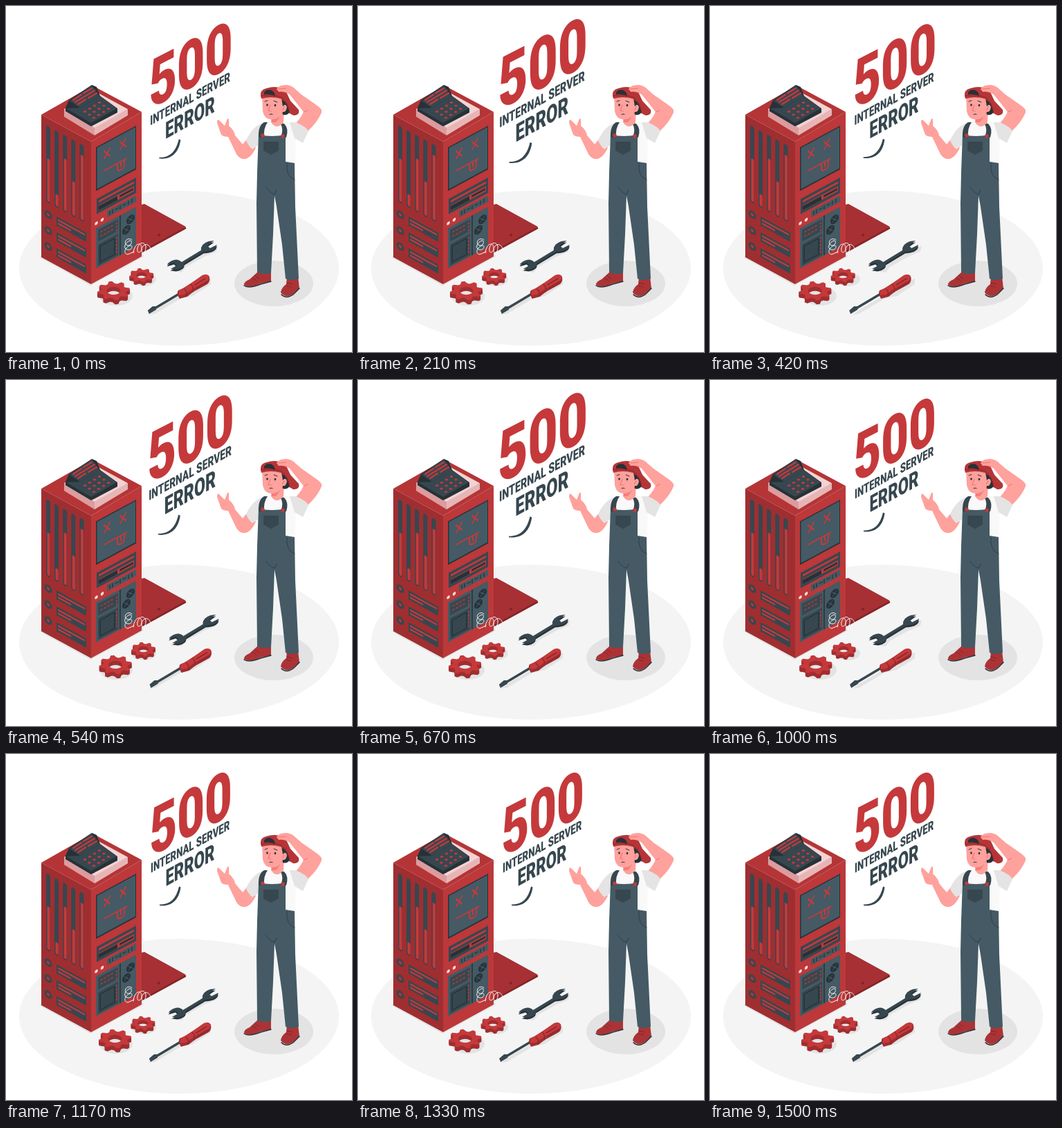
An HTML page that plays this animation: 500x500 px, repeating every 1540 ms.

```html
<!DOCTYPE html>
<html lang="en">
<head>
<meta charset="utf-8">
<title>500 Internal Server Error</title>
<style>
html, body { margin: 0; width: 100%; height: 100%; overflow: hidden; background: #fff; }
svg { display: block; width: 100vw; height: 100vh; }
text { font-family: Roboto, "Liberation Sans", sans-serif; font-weight: 900; }
.red { fill: #c5393b; } .mid { fill: #b53537; } .deep { fill: #9f2e31; } .dark { fill: #842427; }
.slate { fill: #455a64; } .navy { fill: #37474f; } .ink { fill: #263238; }
.skin { fill: #ffa19c; } .shade { fill: #e3e3e3; } .shirt { fill: #f9f9f9; } .sleeve { fill: #e4e4e4; }
.line { fill: none; stroke-linecap: round; stroke-linejoin: round; }
</style>
</head>
<body>
<svg viewBox="0 0 500 500">
  <ellipse cx="250" cy="379" rx="231" ry="112" fill="#f4f4f4"/>
  <ellipse class="shade" cx="387" cy="401" rx="57" ry="33"/>

  <!-- loose side panel -->
  <path class="shade" d="M196 290L262 321L196 358Z"/>
  <path class="dark" d="M196 288L260 320V322L196 357Z"/>
  <path fill="#a63033" d="M196 287L200 286L260 319L196 354Z"/>
  <circle class="dark" cx="221" cy="331" r="2"/>

  <!-- tower -->
  <path class="shade" d="M48 363L122 404L199 362L196 355L60 355Z"/>
  <path class="mid" d="M51 157L125 115L196 153L123 196Z"/>
  <path class="deep" d="M51 157L123 196V402L51 363Z"/>
  <path fill="#bc383a" d="M123 196L196 153V362L123 402Z"/>
  <g id="leftFace" transform="matrix(1 .55 0 1 51 157)"></g>
  <g transform="matrix(1 -.54 0 1 123 196)">
    <path class="ink" d="M7 12H65V75H7Z"/>
    <path class="slate" d="M8.500 13.500H64V73H8.500Z"/>
    <g class="line" stroke="#c5393b" stroke-width="2">
      <path d="M19 24L27 35M27 24L19 35M42 23L50 34M50 23L42 34M19 52H51M38 52V59Q38 64 43 64Q48 64 48 59V52M43 52V59"/>
    </g>
    <path class="navy" d="M8 87H65V109H8Z"/>
    <path class="red" d="M11 91H62V94H11ZM11 98H62V105H11Z"/>
    <path class="ink" d="M11 99H38V105H11ZM41 100H61V103H41Z"/>
    <g fill="#f4dcdc"><circle cx="7.5" cy="122" r="2.3"/><circle cx="16" cy="121.500" r="2.3"/></g>
    <path class="slate" d="M23 113H65V122H23Z"/>
    <path class="line" stroke="#263238" stroke-width="1.300" d="M27 115V120M31 115V120M35 117H39M42 115V120M46 117H50M54 115V120M59 115V120"/>
    <path class="slate" d="M7 129H65V187H7Z"/>
    <path class="navy" d="M10 133H39V150H10ZM10 154H39V185H10Z"/>
    <path class="line" stroke="#263238" stroke-width="1.500" d="M13 158H34V181H13ZM42 130V186"/>
    <path class="line" stroke="#c5393b" stroke-width="1.500" stroke-dasharray="2 3" d="M14 138H31M14 144H31M37 137V150M37 158V182"/>
    <g class="ink"><circle cx="57" cy="143" r="6"/><circle cx="51" cy="155" r="6"/></g>
    <path class="line" stroke="#455a64" d="M54 146L60 140M48 158L54 152M54 140L60 146M48 152L54 158"/>
  </g>
  <g class="line" stroke="#f5f5f5">
    <path d="M182 338C176 333 169 341 174 345S184 341 180 339C173 340 168 350 175 352S184 346 180 346C173 347 168 358 176 359L185 355"/>
    <path d="M184 357C185 344 194 340 196 348S188 360 190 350C192 341 201 340 202 348S195 360 196 351C199 342 207 343 209 351"/>
  </g>

  <!-- console on the roof -->
  <path fill="#dc9c9d" d="M84 149L128 174V187L84 160Z"/>
  <path fill="#e7b5b5" d="M128 174L176 149V158L128 187Z"/>
  <path fill="#f3d3d3" d="M84 149L130 124L176 149L128 176Z"/>
  <path class="ink" d="M86 147L91 136L124 114L131 117L136 130L161 148V154L123 174L86 152Z"/>
  <path class="navy" d="M92 137L124 115L135 130L107 147Z"/>
  <path class="navy" d="M87 148L107 147L135 130L160 148L123 169Z"/>
  <path class="line" stroke="#c5393b" stroke-width="2.200" d="M97 136L109 128M112 126L124 119M100 139L128 122M104 142L115 135M119 133L131 126"/>
  <g id="keys" class="red"></g>

  <!-- static shadows of the tools -->
  <g class="shade">
    <ellipse cx="159" cy="419" rx="24" ry="14"/><ellipse cx="199" cy="395" rx="18" ry="10"/>
    <path d="M237 383L247 374L286 352L306 347L304 355L287 362L260 377L254 385Z"/>
    <path d="M206 446L219 437L252 418L268 406L296 394L296 402L270 419L252 423L215 445Z"/>
  </g>
  <g id="tools">
    <g id="gears"></g>
    <g id="wrench"></g>
    <path class="line" stroke="#37474f" stroke-width="3.600" d="M215 437L252 415"/>
    <path class="navy" d="M205 440L212 434L218 434L217 439L207 445Z"/>
    <path class="deep" d="M249 411L256 408L267 401L284 390Q291 386 294 391Q296 398 291 402L271 413L262 420L251 423Q246 415 249 411Z"/>
    <path class="red" d="M250 411L256 408L267 401L284 389Q291 386 294 391L292 396L268 410L258 417L250 418Z"/>
    <path class="line" stroke="#8d282b" stroke-width="1.500" d="M267 402Q272 406 270 413M258 409Q263 413 261 419M273 403L288 394M275 408L291 399"/>
  </g>

  <!-- engineer -->
  <path fill="#ab3336" d="M344 403Q344 398 352 395L363 385H383V398L368 401Q352 409 344 403ZM397 414Q398 407 405 402L406 391H422L424 408L414 417Q404 423 397 414Z"/>
  <path class="line" stroke="#263238" stroke-width="1.500" d="M344 404Q351 409 368 402L383 398M398 417Q405 424 415 417L424 408"/>
  <path class="line" stroke="#842427" d="M356 393L362 397M360 390L366 394M405 404L412 406M406 400L414 402"/>
  <path class="skin" d="M311 186L305 169Q305 162 309 166L316 173L320 163Q323 160 322 173Q330 180 331 187L342 200L350 190L361 205Q354 220 345 221Q338 222 333 214L321 189Q314 189 311 186Z"/>
  <path class="shirt" d="M371 169L387 165L402 168L419 168L418 232L366 232V190Z"/>
  <path class="sleeve" d="M371 169Q356 174 347 194Q350 202 356 207L366 200Z"/>
  <path class="slate" d="M365 186Q384 190 404 186V225L417 227L418 290L423 394Q412 398 404 394L399 345L391 290L388 274L386 330L383 386Q370 389 363 385L362 285L363 240Z"/>
  <path class="navy" d="M365 190Q364 173 373 168L378 168Q372 176 373 190ZM397 189Q402 178 396 169L402 170Q409 177 405 190ZM372 196H394V209L383 215L372 209Z"/>
  <path class="line" stroke="#2f3e46" d="M376 262Q381 270 388 272L391 266M406 227Q404 246 417 251"/>
  <g class="red"><circle cx="371" cy="187" r="2.700"/><circle cx="400" cy="188" r="2.700"/></g>
  <path class="skin" d="M383 156L402 150L401 168Q391 180 383 168Z"/>
  <path fill="#f0807d" d="M384 163Q391 164 397 159L390 168L384 168Z"/>
  <path class="ink" d="M395 131L409 136L411 151Q408 159 400 157Z"/>
  <path class="skin" d="M370 130L398 133L400 145Q404 140 406 146Q405 154 400 153Q395 165 383 164Q373 163 371 152Z"/>
  <path class="mid" d="M368 130Q367 121 376 119Q394 113 405 124L411 137L423 150Q425 158 415 158L410 155Q408 140 397 134Q383 130 369 134Z"/>
  <path class="ink" d="M373 125Q377 119 384 122Q389 125 389 131Q382 126 373 128Z"/>
  <path class="line" stroke="#8d282b" d="M369 130Q384 127 398 132Q408 139 410 155"/>
  <g class="ink"><ellipse cx="377.500" cy="143" rx="1.300" ry="1.800"/><ellipse cx="389" cy="143.500" rx="1.300" ry="1.800"/></g>
  <path class="line" stroke="#263238" d="M374 138L378 136.500M387 137L392 139M381 156.500Q383 155.500 385 156.500"/>
  <path class="line" stroke="#ed7774" stroke-width="1.200" d="M382 143L379 151L383 152M402 146L400 150"/>
  <path class="skin" d="M391 120Q394 114 405 114Q414 115 419 121L427 128L447 142Q458 149 456 154Q450 168 436 181Q424 178 415 173Q425 164 430 153L410 128Q402 123 394 124Z"/>
  <path class="line" stroke="#ed7774" d="M393 120L405 119M430 153L436 151"/>
  <path class="sleeve" d="M410 168H419Q435 175 437 181L429 198L417 191Z"/>

  <!-- message -->
  <g id="message">
    <g transform="matrix(.715 -.368 0 1 207.500 149)"><text class="red" font-size="96">500</text></g>
    <g class="navy">
      <g transform="matrix(.69 -.383 0 1 209 172)"><text font-size="19">INTERNAL SERVER</text></g>
      <g transform="matrix(.67 -.372 0 1 230.500 191.500)"><text font-size="33">ERROR</text></g>
      <path d="M222 217.500C237 218 246 209 250 191.500L252.500 192.500C250 212 238 221 222 219Z"/>
    </g>
  </g>
</svg>
<script>
const el = id => document.getElementById(id);
const path = (d, cls) => `<path class="${cls}" fill-rule="evenodd" d="${d}"/>`;

// Vents and drive bays on the left face
const barTops = [60, 105, 47, 73, 28];
let face = barTops.map((top, i) => {
  const x = 10 + i * 12.1;
  return `<path class="line" stroke="#37474f" stroke-width="6" d="M${x} 14V119"/>
    <path class="line" stroke="#c5393b" stroke-width="4" d="M${x + 0.5} ${top}V118"/>`;
}).join('');
for (let i = 0; i < 3; i++) {
  const y = 135 + i * 23;
  face += `<circle class="navy" cx="10" cy="${y + 4}" r="5.500"/><circle class="mid" cx="10" cy="${y + 4}" r="2.300"/>
    <rect class="navy" x="22" y="${y}" width="43" height="13"/>
    <path class="line" stroke="#c5393b" stroke-width="2.500" d="M25 ${y + 4}H62"/>
    <path class="line" stroke="#c5393b" stroke-width="2.500" d="M25 ${y + 9}H42"/>`;
}
el('leftFace').innerHTML = face;

let keys = '';
for (let row = 0; row < 3; row++)
  for (let col = 0; col < 4; col++)
    keys += `<ellipse cx="${114 + col * 7 + row * 6.5}" cy="${152.5 - col * 4.3 + row * 4.5}" rx="2.200" ry="1.500"/>`;
el('keys').innerHTML = keys;

function gear(cx, cy, r, depth) {
  const points = [];
  for (let i = 0; i < 32; i++) {
    const a = (i - 1.5) * Math.PI / 16;
    const k = i % 4 < 2 ? 1 : 0.76;
    points.push(`${(r * k * Math.cos(a)).toFixed(1)} ${(r * 0.58 * k * Math.sin(a)).toFixed(1)}`);
  }
  const h = r * 0.42, v = h * 0.58;
  const d = `M${points.join('L')}ZM${-h} 0a${h} ${v} 0 1 0 ${2 * h} 0a${h} ${v} 0 1 0 ${-2 * h} 0Z`;
  let out = '';
  for (let z = depth; z >= 0; z--)
    out += `<g transform="translate(${cx} ${cy + z})">${path(d, z ? 'deep' : 'red')}</g>`;
  return out;
}
el('gears').innerHTML = gear(196, 389, 17.7, 5) + gear(155.7, 411.5, 23.8, 6);

const wrench = 'M240 368Q248 364 254 370L282 353Q281 344 293 340L301 339L291 346L295 350L305 345Q304 352 294 354Q289 355 286 355L258 372Q258 379 246 381L238 380L247 375L243 371L233 374Q234 371 240 368Z';
el('wrench').innerHTML = `<g transform="translate(0 2.500)">${path(wrench, 'ink')}</g>` + path(wrench, 'navy');

// Linear interpolation through [time, value] pairs
function track(points, t) {
  const i = Math.max(1, points.findIndex(p => p[0] >= t));
  const [t0, v0] = points[i - 1], [t1, v1] = points[i];
  return v0 + (v1 - v0) * (t - t0) / (t1 - t0);
}
const beat = [[0, 0.15], [170, 1], [440, 0], [640, 1], [930, 0], [1600, 0]];
const shake = [0, -1, 2, -4, 4, -4, 4, -4, 2, -1, 0].map((v, i) => [i * 150, v]);
const LOOP = 1540, STEP = 1000 / 24;

function draw(now) {
  const t = Math.floor((now % LOOP + 4) / STEP) * STEP;
  const scale = 1 + 0.095 * track(beat, t);
  el('message').setAttribute('transform', `translate(267.5 123.5) scale(${scale}) translate(-267.5 -123.5)`);
  el('tools').setAttribute('transform', `translate(${track(shake, (t + 30) % 1500)} 0)`);
}
const start = performance.now();
function tick() {
  draw(performance.now() - start);
  requestAnimationFrame(tick);
}
tick();
</script>
</body>
</html>
```
